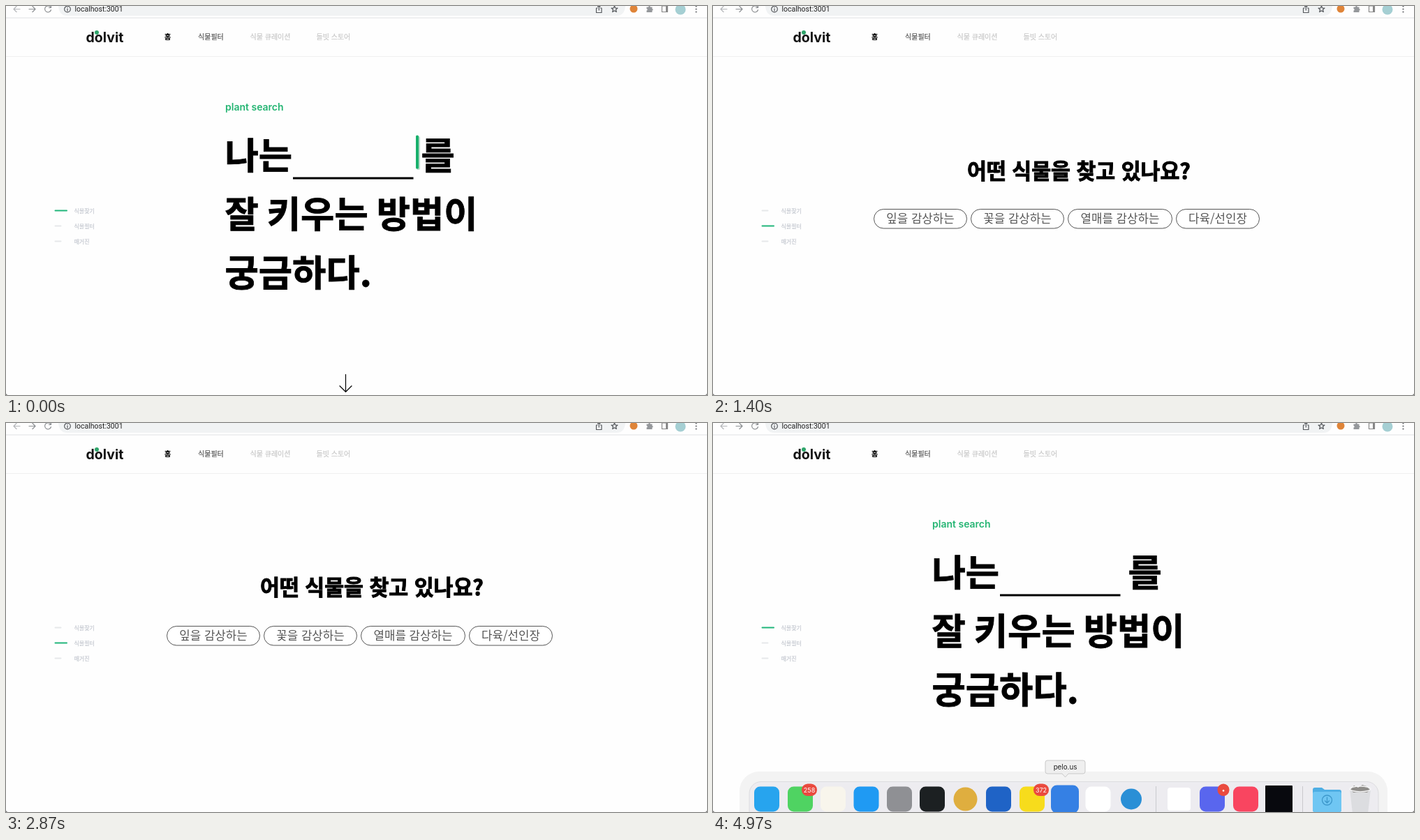
Write an HTML page that moves like this. It is 1004 px wide and 558 px high and loops after 5040 ms.

```html
<!DOCTYPE html>
<html lang="ko">
<head>
<meta charset="utf-8">
<title>식물 찾기</title>
<style>
html, body { margin: 0; width: 100%; height: 100%; overflow: hidden; background: #fff; }
svg { display: block; width: 1004px; height: 558px; }
text { font-family: "Noto Sans CJK KR", "Noto Sans CJK", "Noto Sans CJK SC", sans-serif; white-space: pre; }
.latin { font-family: Inter, sans-serif; }
.mid { text-anchor: middle; }
.line { fill: none; stroke-linecap: round; stroke-linejoin: round; }
.hero { font-size: 52.5px; font-weight: 700; word-spacing: -2.7px; stroke: #000; stroke-width: .8px; }
.title { font-size: 30.3px; font-weight: 900; stroke: #000; stroke-width: 1px; }
.nav { font-size: 10px; font-weight: 500; fill: #c6c6c6; stroke: #c6c6c6; stroke-width: .2px; }
.nav.on { fill: #000; stroke: #000; font-weight: 700; }
.nav.dark { fill: #555; stroke: #555; }
.side { font-size: 8px; font-weight: 500; fill: #c3c7cf; stroke: #c3c7cf; stroke-width: .2px; }
.head { font-size: 27px; font-weight: 700; letter-spacing: -2.35px; stroke: #000; stroke-width: .5px; }
.body { font-size: 12px; letter-spacing: -1.15px; fill: #1c1c1c; }
.meta { font-size: 10px; letter-spacing: -.7px; font-weight: 500; fill: #444; }
.tag { font-size: 10.3px; font-style: italic; font-weight: 500; fill: #35a67a; }
.pill rect { fill: #fff; stroke: #555; }
.pill text { font-size: 16.8px; fill: #555; }
.badge { font-size: 9px; fill: #fff; }
</style>
</head>
<body>
<svg viewBox="0 0 1004 558">
  <rect width="1004" height="558" fill="#fefefe"/>

  <g id="page">
    <g id="search">
      <text class="latin" x="314" y="150" font-size="14" font-weight="600" fill="#25b573">plant search</text>
      <g class="hero">
        <text x="313.5" y="234.3">나는</text>
        <text x="594.5" y="234.3">를</text>
        <text x="313.5" y="318.3">잘 키우는 방법이</text>
        <text x="313.5" y="402.3">궁금하다.</text>
      </g>
      <rect x="411" y="245.500" width="172.500" height="3"/>
      <g id="caret">
        <rect x="588" y="187" width="5" height="48" rx="2" fill="#b9dccb"/>
        <rect x="587" y="185.500" width="4" height="48" rx="1.500" fill="#18b06c"/>
      </g>
      <path id="arrow" class="line" stroke="#000" stroke-width="1.200" d="M486.500 528.500V553.500M478 545L486.500 553.500L495 545"/>
    </g>

    <g id="filter">
      <text class="title mid" x="524" y="247.500">어떤 식물을 찾고 있나요?</text>
      <g id="pills"></g>
    </g>

    <g id="magazine">
      <text class="head" x="191" y="205">물 주기,</text>
      <text class="head" x="191" y="244.500">내가 뭘 잘못한 거지?</text>
      <text class="body" x="191" y="314.500" style="font-weight:700">우리 집 식물이 죽은 이유</text>
      <g id="story"></g>
      <text class="latin tag" x="191" y="434">copy.</text>
      <text class="meta" x="219.500" y="434.500">도새솔</text>
      <path d="M252.500 427V436" stroke="#999"/>
      <text class="latin tag" x="263" y="434">date.</text>
      <text class="meta latin" x="290" y="434">2020.12.04</text>

      <rect x="526" y="176" width="287" height="286.500"/>
      <g fill="#2421b2">
        <path d="M586 334H617L616 404H588Z"/>
        <path d="M621 378H643L641 412Q632 415 623 412Z"/>
        <path d="M547 385Q562 382 577 385L578 394Q560 396 547 385Z"/>
        <path d="M662 314H696L697 385Q690 392 665 391Z"/>
        <path d="M694 355H718V403H693Z"/>
        <path d="M722 336H769L766 393L727 392Z"/>
        <path d="M754 387H785Q783 400 776 405H764Q756 400 754 387Z"/>
      </g>
      <g fill="#2c74bd">
        <ellipse cx="601.500" cy="334" rx="14.500" ry="3"/>
        <ellipse cx="632" cy="378" rx="11" ry="2.500"/>
        <ellipse cx="564" cy="384.500" rx="14" ry="2.800"/>
        <ellipse cx="679" cy="314" rx="16" ry="4"/>
        <ellipse cx="706" cy="356" rx="12" ry="2.500"/>
        <ellipse cx="745.500" cy="336.500" rx="23" ry="3.200"/>
        <ellipse cx="769.500" cy="387" rx="15" ry="3.500"/>
      </g>
      <g class="line" stroke="#fff" stroke-width="1.800">
        <path d="M594 309L608 308.500V314H594ZM597 314V320Q586 323 583 329V349Q587 352 583 356Q580 360 585 363Q580 368 585 372Q580 377 584 381Q580 386 584 390L583 403Q588 408 611 405M606 314V320Q618 323 620 329V350"/>
        <ellipse cx="632" cy="358" rx="15" ry="4.500"/>
        <path d="M617 358L619 409Q622 415 632 415Q643 414 645 409L647 358"/>
        <path d="M580 367Q560 365 545 369Q537 374 548 376L577 374M541 373Q546 392 562 395H580"/>
        <path d="M675 265L683 264L682 281L673 282ZM676 285V293Q674 300 665 308Q660 313 660 320L662 386Q664 395 684 393M684 285V294Q686 302 694 308Q699 313 699 330"/>
        <path d="M691 334H720Q723 338 720 342H691Q689 338 691 334ZM693 345Q687 350 688 358L689 403Q705 407 721 405L722 355Q721 349 717 345"/>
        <path d="M715 310Q714 305 723 304Q745 302 768 304Q774 307 766 309Q746 310 727 307M715 310L719 331M771 309L773 364M719 385L723 395L748 396M773 323Q783 321 784 329L783 350Q781 357 773 358M776 330Q779 328 779 333L777 348Q776 352 774 352"/>
        <ellipse cx="769.500" cy="374.500" rx="18" ry="5.500"/>
        <path d="M751 376Q751 398 763 406Q770 409 778 406Q788 397 788 376M787 385Q795 382 796 389Q795 398 785 398"/>
      </g>
    </g>
  </g>

  <g id="sidebar"></g>

  <g id="header">
    <rect y="17" width="1004" height="55" fill="#fefefe"/>
    <path d="M0 72.500H1004" stroke="#efefef"/>
    <text class="latin" x="114.500" y="52" font-size="19.500" font-weight="700" fill="#111">dolvit</text>
    <circle cx="130" cy="38" r="3" fill="#2fa56b"/>
    <text class="nav on" x="227" y="48">홈</text>
    <text class="nav dark" x="275" y="48">식물필터</text>
    <text class="nav" x="349.500" y="48">식물 큐레이션</text>
    <text class="nav" x="444.500" y="48">돌빗 스토어</text>
  </g>

  <g id="browser">
    <rect width="1004" height="17" fill="#fefefe"/>
    <path d="M75 0H887Q886 14 874 14H88Q76 14 75 0Z" fill="#f1f3f4"/>
    <path d="M0 17H1004" stroke="#dfe1e4"/>
    <g class="line" stroke="#b4b6b9" stroke-width="1.200">
      <path d="M20 4.500H11M15 .500L11 4.500L15 8.500"/>
      <path d="M33 4.500H42M38 .500L42 4.500L38 8.500" stroke="#8e9194"/>
      <path d="M64 2A4.500 4.500 0 1 0 64.500 5.500M64.500 0V2.500H61.500" stroke="#8e9194"/>
      <g stroke="#55585c">
        <circle cx="88" cy="4.500" r="4.300"/>
        <path d="M88 4V7M88 2.200V2.300M847 3H845.500V9.500H853V3H851.500M849.300 6V0M847.500 1L849.300 -1L851 1"/>
        <path d="M871.500 0L872.800 3H876L873.500 5L874.300 8.500L871.500 6.700L868.700 8.500L869.500 5L867 3H870.200Z"/>
      </g>
      <rect x="939.500" y="0" width="8" height="8.500" stroke="#888"/>
    </g>
    <path d="M945 0H948V8.500H945Z" fill="#888"/>
    <path d="M917.500 1.500H920Q921.500 -2 923 1.500H925.500V4Q928 5 925.500 6.500V9H917.500V6.500Q920 5 917.500 4Z" fill="#95989b"/>
    <text x="98.500" y="8" font-size="10.500" fill="#222" style="font-family:Roboto,sans-serif">localhost:3001</text>
    <circle cx="899" cy="4" r="5.500" fill="#df8438"/>
    <circle cx="966" cy="5" r="7.500" fill="#a5cfd3"/>
    <g fill="#66696d"><circle cx="988.500" cy=".500" r="1.100"/><circle cx="988.500" cy="4.500" r="1.100"/><circle cx="988.500" cy="8.500" r="1.100"/></g>
  </g>

  <g id="dock">
    <rect x="38" y="500" width="928" height="90" rx="28" fill="#f3f3f3"/>
    <rect x="52" y="514.500" width="901" height="60" rx="17" fill="#edecf0" stroke="#dcdcdf"/>
    <path d="M634.500 521V558M844.500 521V558" stroke="#c9c9cd"/>
    <g id="apps"></g>
    <path d="M859 526Q859 523 862 523H872L876 526H897Q900 526 900 529V555Q900 558 897 558H862Q859 558 859 555Z" fill="#4eaee4"/>
    <rect x="859" y="529" width="41" height="29" rx="3" fill="#6fc6f3"/>
    <circle cx="879.500" cy="541" r="7" fill="none" stroke="#3d98cb" stroke-width="1.300"/>
    <path class="line" d="M879.500 537V545M876.500 542L879.500 545L882.500 542" stroke="#3d98cb" stroke-width="1.300"/>
    <path d="M912 525H942L938 560H916Z" fill="#dcdde0"/>
    <path d="M913 526L918 520L924 523L930 519L936 521L941 526L937 530H917Z" fill="#8f8d8a"/>
    <ellipse cx="927" cy="525" rx="15" ry="4" fill="none" stroke="#f6f6f7" stroke-width="1.500"/>
    <g id="badges"></g>
    <path d="M479 484H530Q533 484 533 487V500Q533 503 530 503H509L504.500 508L500 503H479Q476 503 476 500V487Q476 484 479 484Z" fill="#efefef" stroke="#c9c9c9"/>
    <text class="latin mid" x="504.500" y="496.500" font-size="9.800" fill="#222">pelo.us</text>
  </g>

  <path d="M0 555Q0 558 3 558H0ZM1004 555Q1004 558 1001 558H1004Z" fill="#555"/>
</svg>

<script>
const LOOP = 5040, STEP = 70, PITCH = 612.5;
const $ = id => document.getElementById(id);
const fill = (id, items, html) => { $(id).innerHTML = items.map(html).join(''); };
const shift = (id, y) => $(id).setAttribute('transform', `translate(0 ${y.toFixed(2)})`);

fill('pills', [
  [230, 134, '잎을 감상하는'], [369, 134, '꽃을 감상하는'],
  [508, 150, '열매를 감상하는'], [663, 120, '다육/선인장']
], ([x, w, label]) => `<g class="pill"><rect x="${x + .5}" y="291.5" width="${w - 1}" height="27.5" rx="13.7"/>
  <text class="mid" x="${x + w / 2}" y="311.3">${label}</text></g>`);

fill('story', [
  '사실, 처음에는 화분을 받으며, 약간은 난감함이 교차했다. 집에 들여',
  '놓는 식물은 들이는 족족 죽이는 ‘킬러의 손’인 내가 과연 이 식물들',
  '을 죽이지 않고 잘 키울 수 있을까? 현재는 우리는 30가지가 넘는 식',
  '물들을 키우고 있고 주변에서 부탁하는 아픈 식물들..'
], (line, i) => `<text class="body" x="191" y="${340.5 + 19 * i}">${line}</text>`);

fill('sidebar', ['식물찾기', '식물필터', '매거진'], (label, i) =>
  `<rect class="mark" x="69.5" y="${292.5 + 22 * i}" height="2" rx="1"/>
   <text class="side" x="97.5" y="${296.7 + 22 * i}">${label}</text>`);
const marks = [...document.querySelectorAll('.mark')];

// centre, colour, size, corner radius
fill('apps', [
  [77, '#27a4ee'], [125, '#4fd362'], [172, '#f8f5ec'], [219.5, '#1f9af3'], [267, '#8f9094'],
  [314, '#1c2022'], [361.5, '#dfae3f', 34, 17], [409, '#1f63c6'], [457, '#f7dc1c'],
  [504, '#3580e4', 40], [551.5, '#ffffff'], [599, '#2a8fd6', 30, 15], [667.5, '#ffffff', 33, 4],
  [715, '#5966ee'], [763, '#f94560'], [810.5, '#08090e', 39, 1]
], ([x, color, size = 36, r = 8.5]) =>
  `<rect x="${x - size / 2}" y="${539.5 - size / 2}" width="${size}" height="${size}" rx="${r}" fill="${color}"/>`);

fill('badges', [[138, 22, '258'], [470, 22, '372'], [731, 17, '•']], ([x, w, label]) =>
  `<rect x="${x - w / 2}" y="517.5" width="${w}" height="17.5" rx="8.7" fill="#ea4a3f"/>
   <text class="latin badge mid" x="${x}" y="529.5">${label}</text>`);

const clamp = v => Math.min(1, Math.max(0, v));
const easeInOut = p => p < .5 ? 4 * p ** 3 : 1 - 4 * (1 - p) ** 3;
const easeOut = p => 1 - (1 - p) ** 3;

// The later scrolls become visible only part of the way in.
const scrolls = [
  { from: 0, to: 1, start: 810, end: 1400, shown: 840 },
  { from: 1, to: 2, start: 1320, end: 1890, shown: 1540 },
  { from: 2, to: 1, start: 2358, end: 2880, shown: 2590 },
  { from: 1, to: 0, start: 2954, end: 3544, shown: 3220 }
];

function draw(t) {
  const s = scrolls.filter(m => t >= m.shown).pop();
  const pos = s ? s.from + (s.to - s.from) * easeInOut(clamp((t - s.start) / (s.end - s.start))) : 0;
  const active = s ? s.to : 0;
  ['search', 'filter', 'magazine'].forEach((id, i) => shift(id, (i - pos) * PITCH));

  marks.forEach((m, i) => {
    m.setAttribute('width', i === active ? 18.5 : 10);
    m.setAttribute('fill', i === active ? '#20b57a' : '#e6e8ea');
  });

  shift('arrow', -6.5 * (1 - Math.cos(Math.PI * t / 870)));
  $('caret').style.opacity = t % 1000 < 500 ? 1 : 0;
  shift('dock', 80 * (1 - easeOut(clamp((t - 4620) / 320))));
}

function tick(now) {
  draw(Math.floor(now % LOOP / STEP) * STEP);
  requestAnimationFrame(tick);
}
draw(0);
requestAnimationFrame(tick);
</script>
</body>
</html>
```
